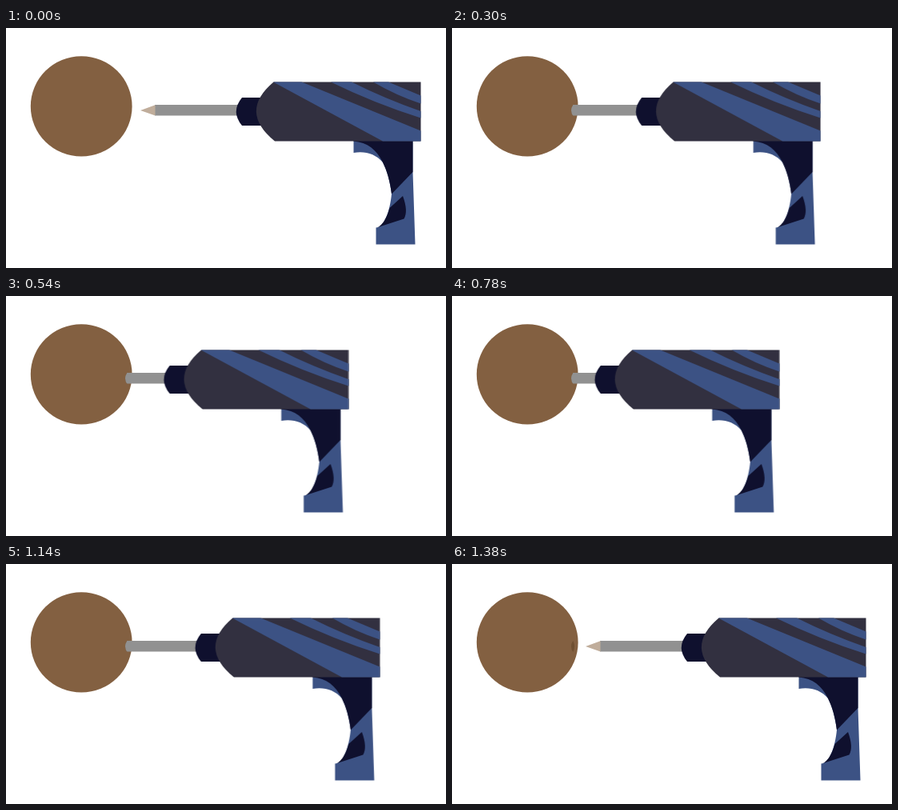
An HTML page without scripts for the animation above (1.92 s loop, 550 by 300 pixels).

```html
<!DOCTYPE html>
<html lang="en">
<head>
<meta charset="utf-8">
<title>Drill</title>
<style>
  html, body { margin: 0; width: 100%; height: 100%; overflow: hidden; background: #fff; }
  svg { display: block; width: 550px; height: 300px; }

  .wood { fill: #836041; }
  .hole { fill: #6f4f31; }
  .steel { fill: #919191; }
  .tip { fill: #c0ad9b; }
  .grey { fill: #323040; }
  .blue { fill: #3c5284; }
  .navy { fill: #0f102e; }

  /* The small lead keeps step boundaries clear of rounding. */
  .drill, .hole { animation: 1920ms -2ms infinite; }
  .drill { animation-name: push; }
  .hole { animation-name: pierce; animation-timing-function: step-end; }

  /* Fast approach, slow drilling, quick retreat, rest: 60 ms per step. */
  @keyframes push {
    0% { transform: translateX(0); animation-timing-function: steps(7); }
    21.875% { transform: translateX(-81px); animation-timing-function: steps(7); }
    43.75% { transform: translateX(-114px); animation-timing-function: steps(9); }
    71.875%, 100% { transform: translateX(-1px); }
  }
  @keyframes pierce {
    0% { opacity: 0; }
    6.25%, 100% { opacity: 1; }
  }
</style>
</head>
<body>
<svg viewBox="0 0 550 300">
  <clipPath id="outside">
    <path d="M151.3 0V96Q146.7 103 151.3 110V300H550V0Z"/>
  </clipPath>

  <ellipse class="wood" cx="94.2" cy="97.9" rx="63.4" ry="62.7"/>
  <path class="hole" d="M151.3 96Q146.7 103 151.3 110Q154.9 103 151.3 96Z"/>

  <g clip-path="url(#outside)">
    <g class="drill">
      <path class="steel" d="M186 96H300V109.5H186Z"/>
      <path class="tip" d="M168 103L186.5 96.3V109.5Z"/>
      <path class="navy" d="M295 87H325V122H295Q280.5 104.5 295 87Z"/>

      <!-- handle -->
      <path class="blue" d="M434.5 141H508.5V180L511.5 270.5H462.5V249.5C473 249 480 228 482 207.5C480 191 476 178 471 168C462 157 448 153.500 434.500 156Z"/>
      <path class="navy" d="M434.500 141H508.500V180L482 207.500C480 191 476 178 471 168C463 152 452 143 434.500 141.500Z"/>
      <path class="navy" d="M479.500 225L496 210Q503 229 497.500 238.500L465 249Q474 244 479.500 225Z"/>

      <!-- body -->
      <path class="grey" d="M334.500 67.500H518.500V141.500H336Q290.500 104.500 334.500 67.500Z"/>
      <g class="blue">
        <path d="M334 67.500H369.500L518.500 128.500V141.500H471Z"/>
        <path d="M406 67.500H432Q474 88.500 518.500 104V112.500Q460 94 406 67.500Z"/>
        <path d="M459 67.500H478L518.500 84.500V94.500Q487 84 459 67.500Z"/>
      </g>
    </g>
  </g>
</svg>
</body>
</html>
```
